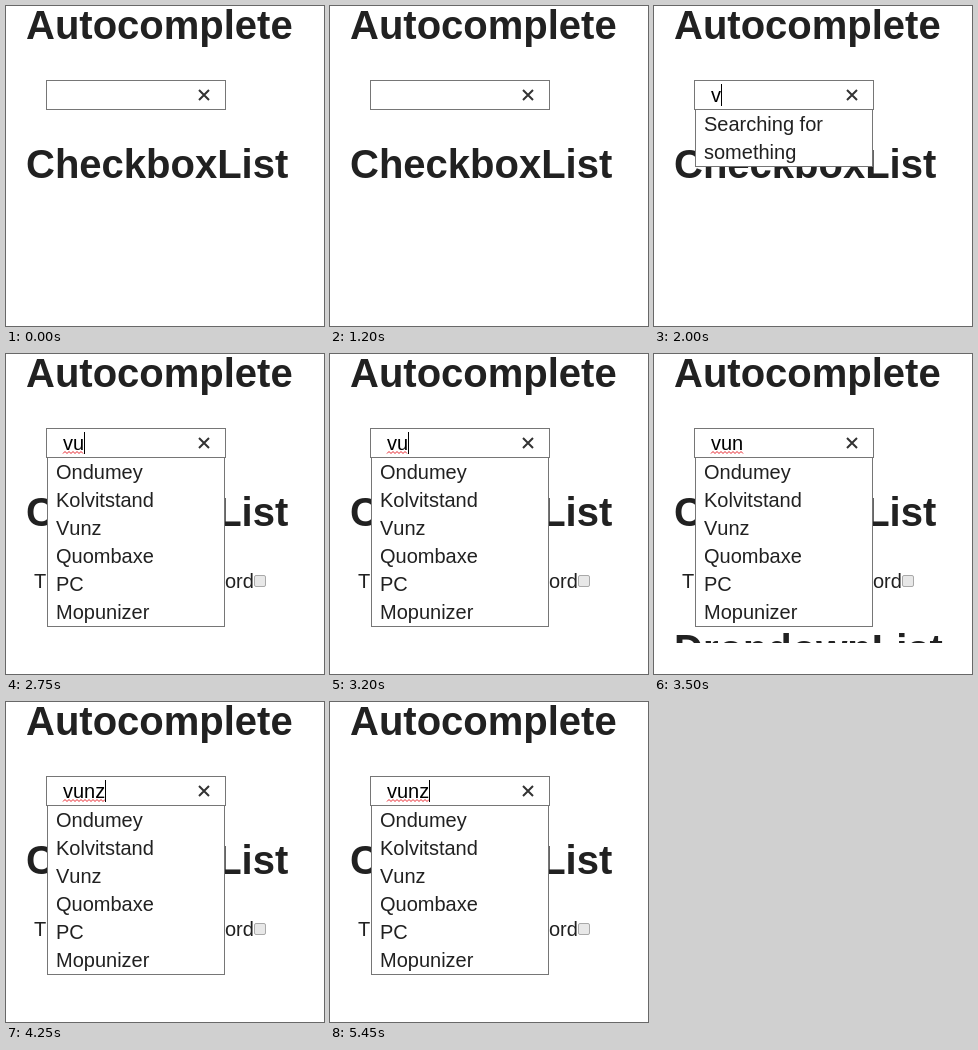
An HTML page that plays this animation: 318x320 px, repeating every 6.25 s.

```html
<!DOCTYPE html>
<html lang="en">
<head>
<meta charset="utf-8">
<title>Autocomplete</title>
<style>
  html, body { margin: 0; width: 100%; height: 100%; overflow: hidden; background: #fff; }
  svg { display: block; width: 100%; height: 100%; }
  text { font: 20px "Liberation Sans", Arial, sans-serif; font-kerning: none; fill: #212121; }
  .heading { font-size: 40px; font-weight: bold; }
  .box { fill: #fff; stroke: #767676; }
  #query { fill: #000; }
</style>
</head>
<body>
<svg viewBox="0 0 318 320">
  <defs>
    <clipPath id="painted"><rect width="318" height="289"/></clipPath>
  </defs>
  <text class="heading" x="20" y="33">Autocomplete</text>
  <text class="heading" x="20" y="172">CheckboxList</text>
  <g id="checkboxRow">
    <text x="28" y="234">T</text>
    <text x="219" y="234">ord</text>
    <rect x="248.5" y="221.5" width="11" height="11" rx="1.5" fill="#e8e8e8" stroke="#a9a9a9"/>
  </g>
  <g id="nextHeading" clip-path="url(#painted)">
    <text class="heading" x="20" y="309">DropdownList</text>
  </g>
  <g id="list"></g>
  <rect class="box" x="40.5" y="74.5" width="179" height="29"/>
  <path d="M193 84l10 10m0-10l-10 10" stroke="#333" stroke-width="2"/>
  <text id="query" x="57" y="96"></text>
  <path id="squiggle" fill="none" stroke="#e8222a"/>
  <path id="caret" stroke="#000"/>
</svg>
<script>
const $ = id => document.getElementById(id);
const LOOP = 6250;
const INPUT_X = 57, ROW = 28, LIST_TOP = 104;

const waiting = ["Searching for", "something"];
const results = ["Ondumey", "Kolvitstand", "Vunz", "Quombaxe", "PC", "Mopunizer"];

const states = [
  { at: 0, query: "", rows: [] },
  { at: 2000, query: "v", rows: waiting, caret: 67 },
  { at: 2750, query: "vu", rows: results, caret: 78, wavyTo: 78 },
  { at: 3500, query: "vun", rows: results, wavyTo: 89, nextHeading: true },
  { at: 4250, query: "vunz", rows: results, caret: 99, wavyTo: 99 },
];

function listMarkup(rows) {
  if (!rows.length) return "";
  const height = rows.length * ROW + 1;
  const labels = rows.map((label, i) =>
    `<text x="50" y="${LIST_TOP + 21 + i * ROW}">${label}</text>`);
  return `<rect class="box" x="41.5" y="${LIST_TOP - 0.5}" width="177" height="${height}"/>` + labels.join("");
}

function squigglePath(end) {
  let path = `M${INPUT_X} 99.5`;
  for (let x = INPUT_X + 2, up = true; x <= end; x += 2, up = !up) {
    path += `L${x} ${up ? 97.5 : 99.5}`;
  }
  return path;
}

function show(element, visible) {
  element.style.display = visible ? "" : "none";
}

function render(state) {
  $("query").textContent = state.query;
  $("list").innerHTML = listMarkup(state.rows);
  $("squiggle").setAttribute("d", state.wavyTo ? squigglePath(state.wavyTo) : "");
  $("caret").setAttribute("d", state.caret ? `M${state.caret + 0.5} 78v22` : "");
  show($("checkboxRow"), state.rows === results);
  show($("nextHeading"), state.nextHeading);
}

let current;
const start = performance.now();

function tick() {
  const time = (performance.now() - start) % LOOP;
  const state = states.findLast(s => s.at <= time);
  if (state !== current) render(current = state);
  requestAnimationFrame(tick);
}
tick();
</script>
</body>
</html>
```
